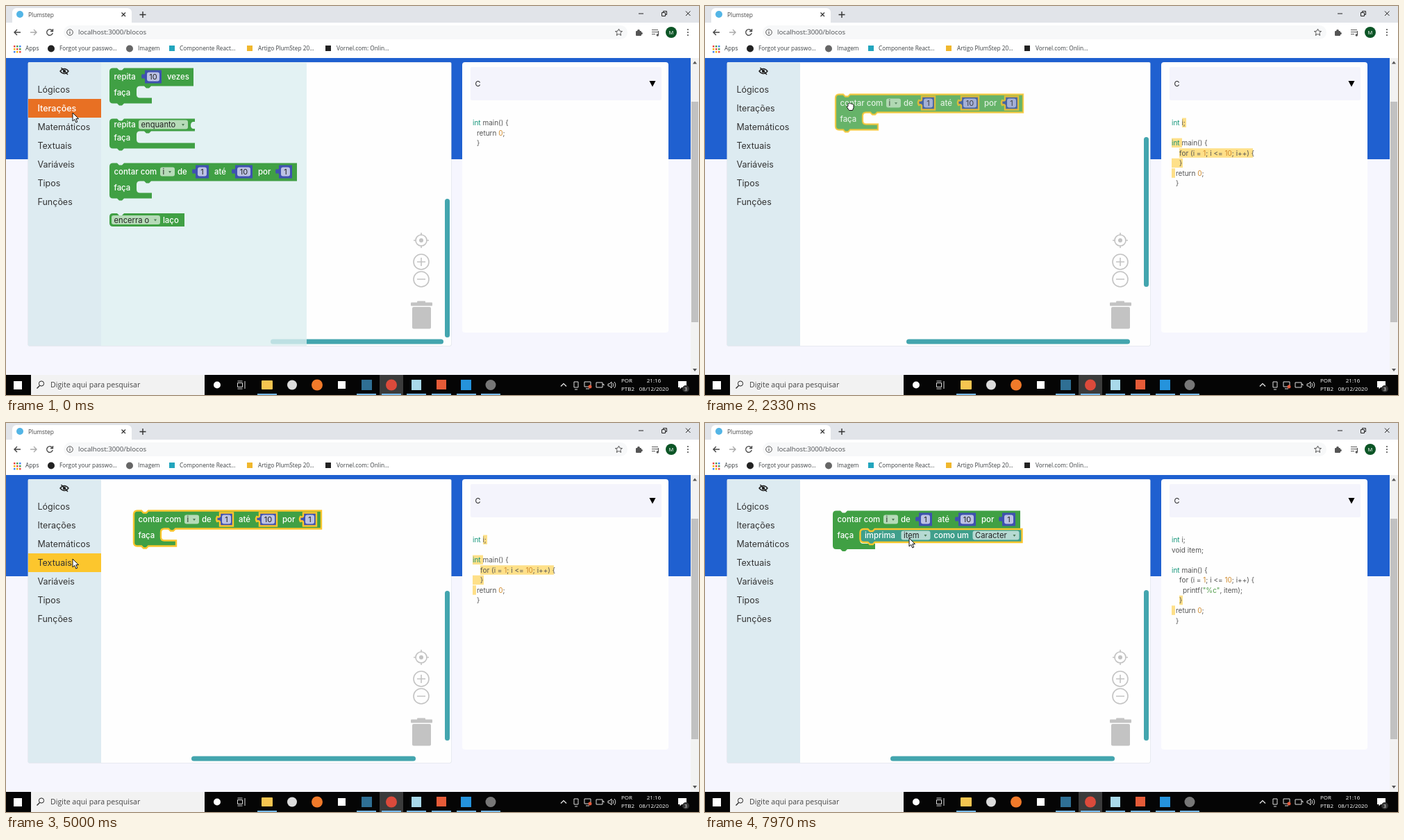
An HTML page with a canvas that plays this animation: 998 px wide and 561 px high, repeating every 8000 ms.

```html
<!DOCTYPE html>
<html lang="pt-BR">
<head>
<meta charset="utf-8">
<title>Plumstep</title>
<style>
  html, body { margin: 0; width: 100%; height: 100%; overflow: hidden; background: #fff; }
  canvas { display: block; width: 998px; height: 561px; }
</style>
</head>
<body>
<canvas id="stage"></canvas>
<script>
const LOOP = 8000, W = 998, H = 561;
const PICK_LOOP = 1640, DROP_LOOP = 2600, OPEN_TEXT = 5200, PICK_PRINT = 6700, DROP_PRINT = 7400;
const UI = '"Open Sans", sans-serif', APP = 'Inter, sans-serif';
const GREEN = '#40a044', TEAL = '#3f9f8b', BLUE = '#3f51b0', YELLOW = '#fcc62d';
const canvas = document.getElementById('stage');
const dpr = window.devicePixelRatio || 1;
canvas.width = W * dpr;
canvas.height = H * dpr;
const c = canvas.getContext('2d');

// ---- drawing helpers ----
function rect(x, y, w, h, color, r = 0) {
  c.fillStyle = color;
  c.beginPath();
  c.roundRect(x, y, w, h, r);
  c.fill();
}
function disc(x, y, r, color) {
  c.fillStyle = color;
  c.beginPath();
  c.arc(x, y, r, 0, 7);
  c.fill();
}
function ring(x, y, r, color, width = 1) {
  c.strokeStyle = color;
  c.lineWidth = width;
  c.beginPath();
  c.arc(x, y, r, 0, 7);
  c.stroke();
}
function path(d, color, width = 1.2, fill) {
  const p = new Path2D(d);
  if (fill) { c.fillStyle = fill; c.fill(p); }
  if (color) { c.strokeStyle = color; c.lineWidth = width; c.stroke(p); }
}
function text(s, x, y, size, color, font = UI, weight = 400, align = 'left') {
  c.font = `${weight} ${size}px ${font}`;
  c.fillStyle = color;
  c.textAlign = align;
  c.fillText(s, x, y + size * 0.36);
}
function at(x, y, draw) {
  c.save();
  c.translate(x, y);
  draw();
  c.restore();
}

// ---- browser and desktop ----
function drawBrowser() {
  rect(0, 0, W, 24, '#e1e4e9');
  rect(9, 3, 172, 22, '#fff', [6, 6, 0, 0]);
  rect(0, 24, W, 51, '#fff');
  disc(20, 12, 5, '#53b5e6');
  text('Plumstep', 32, 12.5, 8.4, '#444');
  path('M166.500 9.500l5.500 5.500m0-5.500l-5.500 5.500', '#333');
  path('M192.500 12.500h9m-4.500-4.500v9', '#333', 1.4);
  path('M911 11h7M979 7.500l6.500 6.500m0-6.500l-6.500 6.500M944.500 9.500h5v5h-5zM946.500 9.500v-2h5v5h-2', '#222', 1);
  path('M21 38H12m4-4l-4 4 4 4', '#444', 1.4);
  path('M35 38h9m-4-4l4 4-4 4', '#aaa', 1.4);
  path('M66.500 35.500a4.300 4.300 0 1 0 .7 3.500M67.500 33v3.500h-3.500', '#444', 1.3);
  rect(83, 28, 812, 20, '#f7f8f9', 10);
  ring(92, 38, 4.3, '#555');
  path('M92 37.300v3M92 35.300v1', '#555');
  text('localhost:3000/blocos', 104, 38, 9.7, '#4a4d50');
  path('M882.500 33l1.500 3.200 3.500.3-2.700 2.300.9 3.600-3.200-1.900-3.200 1.900.9-3.600-2.700-2.300 3.500-.3z', '#555', 1);
  rect(907, 36, 8, 7, '#555', 1);
  disc(911, 35.500, 1.8, '#555');
  disc(915, 39.500, 1.8, '#555');
  path('M930 34.500h9m-9 3h9m-9 3h5M939.500 36v6', '#555');
  disc(938.300, 42, 1.7, '#555');
  disc(958, 38, 8, '#0c5526');
  text('M', 958, 38, 7.5, '#fff', UI, 400, 'center');
  for (const y of [34, 38, 42]) disc(982, y, 1.1, '#555');

  const appColors = ['#e44', '#4a9e52', '#4285f4', '#f4b400'];
  for (let i = 0; i < 9; i++) rect(11 + i % 3 * 4, 57 + (i / 3 | 0) * 4, 2.5, 2.5, appColors[i % 4]);
  disc(65, 61.500, 5, '#222');
  disc(178, 61.500, 5, '#666');
  rect(235, 57, 8, 8, '#22a5bd');
  rect(347, 57, 8, 8, '#f0b72d');
  rect(460, 57, 8, 8, '#222');
  const marks = [['Apps', 28], ['Forgot your passwo...', 77], ['Imagem', 190], ['Componente React...', 250],
    ['Artigo PlumStep 20...', 363], ['Vornel.com: Onlin...', 476]];
  for (const [s, x] of marks) text(s, x, 61.500, 8.3, '#3c4043');
}

function drawTaskbar() {
  rect(0, 532, W, 29, '#050505');
  rect(11, 541, 12, 12, '#fff');
  rect(36, 532, 250, 29, '#f2f2f2');
  ring(51, 544.500, 3.6, '#222');
  path('M48.500 547.500l-4 4', '#222', 1.3);
  text('Digite aqui para pesquisar', 64, 546.500, 10.6, '#444');
  disc(304, 546.500, 5, '#fff');
  path('M333.500 543.500h7v6h-7zM333.500 541h7M333.500 552h7M344 541v11', '#ddd', 1);
  rect(538, 532, 34, 29, '#3b3b3b');
  rect(368, 540, 16, 13, '#f6c550', 1);
  disc(412, 546.500, 7, '#ddd');
  disc(448, 546.500, 8, '#f17a2a');
  rect(478, 541, 11, 11, '#fff');
  rect(512, 539, 15, 15, '#2f6f94');
  disc(555, 546.500, 8, '#dc4a3b');
  rect(584, 539, 14, 15, '#a9d9ea');
  rect(620, 539, 14, 14, '#e65b38');
  rect(655, 539, 15, 15, '#2593dc');
  disc(698, 546.500, 7.5, '#777');
  for (const x of [362, 505, 541, 577, 613, 649, 684]) rect(x, 559, 28, 2, '#76b9ed');
  path('M799 548.500l4-4 4 4', '#eee');
  path('M818 542h6v8h-6zM819 553h4M833 542h9v7h-9zM835 552h5M850 543h9v7h-9zM859 545.500h2v2', '#ddd', 1);
  disc(841, 549, 2.5, '#e25a3c');
  path('M867 545h2l3-3v9l-3-3h-2zM874 544q2 2.500 0 5M876 542q3.500 4.500 0 9', '#ddd', 1);
  text('POR', 886, 540, 8, '#fff');
  text('PTB2', 886, 552.500, 8, '#fff');
  text('21:16', 933, 540, 8, '#fff', UI, 400, 'center');
  text('08/12/2020', 933, 552.500, 8, '#fff', UI, 400, 'center');
  path('M968 541h12v9h-7l-2.500 2.500v-2.500h-2.500z', null, 0, '#fff');
  disc(979, 552, 5, '#333');
  text('3', 979, 552, 7, '#fff', UI, 400, 'center');
}

// ---- page ----
function drawPage() {
  rect(0, 75, 986, 457, '#f6f6fe');
  rect(0, 75, 986, 146, '#1f60d0');
  rect(986, 75, 12, 457, '#f2f2f2');
  rect(987, 138, 10, 318, '#c1c1c1');
  path('M989 83.500l3-4 3 4z', null, 0, '#555');
  path('M989 523l3 4 3-4z', null, 0, '#555');
  rect(31.500, 81, 610, 409.500, '#d9dde4', 2);
  rect(32, 81.500, 609, 408.500, '#fefefe', 2);
  rect(657, 81, 297, 390, '#fefefe', 4);
  rect(669, 88, 275, 48, '#f4f4fc', 2);
  text('C', 675.500, 112, 11, '#222', APP);
  path('M926.500 108h9l-4.500 8.500z', null, 0, '#000');
}

function drawControls() {
  const gray = '#c3c3c3';
  ring(598, 338, 8, gray, 1.6);
  disc(598, 338, 3, gray);
  path('M598 327v4M598 345v4M587 338h4M605 338h4', gray, 1.6);
  ring(598, 369, 11, gray, 1.6);
  ring(598, 394, 11, gray, 1.6);
  path('M592 369h12M598 363v12M592 394h12', gray, 1.6);
  rect(583, 427.500, 31, 5, gray, 1);
  rect(592, 425.500, 12, 3, gray, 1);
  rect(585, 434, 27, 31.500, gray, 2);
}

function drawScrollbars(t) {
  const [top, bottom, left, right] =
    t < PICK_LOOP ? [278, 478, 381, 630] :
    t < DROP_LOOP ? [189, 405, 290, 612] :
    t < PICK_PRINT ? [242, 458, 267, 590] :
    t < DROP_PRINT ? [240, 458, 283, 592] : [241, 458, 267, 590];
  rect(632, top, 7, bottom - top, '#43a5ae', 3.5);
  rect(left, 480.500, right - left, 7, '#43a5ae', 3.5);
}

function drawSidebar(selected, pointer) {
  rect(32, 81.500, 105, 408.500, '#ddebf1');
  path('M78 94q6-7 12 0q-6 7-12 0zM79.500 89l9.500 10', '#222', 1.4);
  disc(84, 94, 2.2, '#222');
  ['Lógicos', 'Iterações', 'Matemáticos', 'Textuais', 'Variáveis', 'Tipos', 'Funções'].forEach((name, i) => {
    const top = 107 + 27 * i, active = i === selected;
    const hover = pointer.x > 32 && pointer.x < 137 && pointer.y >= top && pointer.y < top + 27;
    if (active || hover) rect(32, top, 105, 27, active ? '#e87023' : YELLOW);
    text(name, 45.500, top + 13.500, 12.5, active ? '#fff' : '#333', APP, active ? 500 : 400);
  });
}

// ---- code panel ----
const KEYWORD = '#149579', NUMBER = '#d08a2c', STRING = '#4c9a45', PLAIN = '#555';
const INT_I = [672, 'int', KEYWORD, ' i;', PLAIN];
const MAIN = [672, 'int', KEYWORD, ' main() {', PLAIN];
const FOR = [683, 'for (i = ', PLAIN, '1', NUMBER, '; i <= ', PLAIN, '10', NUMBER, '; i++) {', PLAIN];
const RETURN = [678, 'return ', PLAIN, '0', NUMBER, ';', PLAIN];
const INNER_END = [683, '}', PLAIN], END = [678, '}', PLAIN];
const VOID = [672, 'void item;', PLAIN];
const PRINTF = [688, 'printf(', PLAIN, '"%c"', STRING, ', item);', PLAIN];
const listings = [
  { lines: [MAIN, RETURN, END], marks: [] },
  { lines: [INT_I, [0], MAIN, FOR, INNER_END, RETURN, END],
    marks: [[0, 687, 6], [2, 672, 15], [3, 683, 106], [4, 672, 16], [5, 672, 5]] },
  { lines: [INT_I, VOID, [0], MAIN, FOR, PRINTF, INNER_END, RETURN, END],
    marks: [[6, 683, 5], [7, 672, 5]] }
];
function drawCode({ lines, marks }) {
  const lineY = i => 168.500 + 14.55 * i;
  for (const [i, x, w] of marks) rect(x, lineY(i) - 7, w, 13.500, '#fee089');
  lines.forEach(([x, ...parts], i) => {
    for (let k = 0; k < parts.length; k += 2) {
      text(parts[k], x, lineY(i), 10, parts[k + 1], APP);
      x += c.measureText(parts[k]).width;
    }
  });
}

// ---- blocks, drawn around their own top left corner ----
function shape(d, color, selected) {
  path(d, selected ? YELLOW : null, 2.4, color);
}
const NOTCH = 'l3 3h4l3-3', TAB = 'l-3 3h-4l-3-3';
function stackShape(w, h, color, selected, { mouth = 0, foot = 0, next = true } = {}) {
  let d = `M0 5Q0 0 5 0H11${NOTCH}H${w}V${h}`;
  let bottom = h;
  if (mouth) {
    bottom = h + mouth + 8;
    d += `H60${TAB}H44Q39 ${h} 39 ${h + 5}V${h + mouth - 5}Q39 ${h + mouth} 44 ${h + mouth}H${foot}V${bottom}`;
  }
  d += `H21${next ? TAB : ''}H5Q0 ${bottom} 0 ${bottom - 5}Z`;
  shape(d, color, selected);
}
function valueShape(w, h, color, selected) {
  shape(`M0 0H${w}V${h}H0V13Q-1 11-4 12.500Q-6 9-4 5.500Q-1 7 0 5Z`, color, selected);
}
const label = (s, x, y) => text(s, x, y, 11.4, '#fff', APP, 500);
function dropdown(s, x, y, w) {
  rect(x, y - 6.500, w, 13, 'rgba(255,255,255,.62)', 3);
  text(s, x + 3.500, y, 11.2, '#222', APP);
  path(`M${x + w - 9} ${y - 1}h4l-2 3z`, null, 0, '#4c7a55');
}
function number(s, x, y, w, selected) {
  at(x, y - 9.500, () => {
    valueShape(w, 19, BLUE, selected);
    rect(3, 3, w - 6, 13, '#bcc2e4', 3);
    text(s, w / 2, 9.500, 11, '#222', APP, 400, 'center');
  });
}

function repeatBlock() {
  stackShape(121, 26, GREEN, false, { mouth: 17, foot: 61 });
  label('repita', 6.500, 12.500);
  number('10', 51, 12.500, 24);
  label('vezes', 83, 12.500);
  label('faça', 6.500, 35);
}
function whileBlock() {
  stackShape(123, 18, GREEN, false, { mouth: 17, foot: 123 });
  path('M124 4.500h-4q-3 1-3 5t3 5h4z', null, 0, '#e3f2f2');
  label('repita', 6.500, 8.500);
  dropdown('enquanto', 42, 8.500, 71);
  label('faça', 6.500, 27);
}
function countBlock(selected, mouth = 17) {
  stackShape(270, 26, GREEN, selected, { mouth, foot: 61 });
  label('contar com', 6.500, 12.500);
  dropdown('i', 73, 12.500, 21);
  label('de', 98, 12.500);
  number('1', 124, 12.500, 19, selected);
  label('até', 151, 12.500);
  number('10', 181, 12.500, 25, selected);
  label('por', 214, 12.500);
  number('1', 244, 12.500, 19, selected);
  label('faça', 6.500, 35);
}
function breakBlock() {
  stackShape(108, 19, GREEN, false, { next: false });
  dropdown('encerra o', 3, 9.500, 70);
  label('laço', 77, 9.500);
}
function quoteBlock() {
  valueShape(49, 18, TEAL);
  text('“', 6, 11, 18, '#fff', APP, 700);
  rect(19, 3, 10, 12, '#a8d2c6', 3);
  text('”', 33, 11, 18, '#fff', APP, 700);
}
function printTextBlock() {
  stackShape(70, 19, TEAL);
  label('imprima', 6.500, 9);
  rect(56, 3, 10, 12, '#a8d2c6', 3);
}
function printBlock(selected) {
  stackShape(233, 19, TEAL, selected);
  label('imprima', 6.500, 9);
  dropdown('item', 59, 9, 42);
  label('como um', 106, 9);
  dropdown('Caracter', 162, 9, 67);
}
function readBlock() {
  stackShape(206, 19, TEAL);
  label('leia', 6.500, 9);
  dropdown('item', 32, 9, 42);
  label('como um', 79, 9);
  dropdown('Caracter', 135, 9, 67);
}
function drawFlyout(right, items) {
  rect(137, 81.500, right - 137, 408.500, 'rgba(221,239,240,.8)');
  for (const [y, draw] of items) at(149, y, draw);
}

// ---- pointer ----
const pointerKeys = [
  [0, 96, 154], [350, 96, 155], [1150, 169, 240], [1600, 170, 244], [PICK_LOOP, 170, 244],
  [2250, 210, 145], [2500, 206, 145], [DROP_LOOP, 205, 144], [2750, 203, 145], [3250, 112, 172], [3850, 104, 197],
  [4400, 104, 197], [5000, 96, 196], [5950, 96, 196], [6450, 175, 181], [PICK_PRINT + 30, 175, 182],
  [7250, 248, 171], [DROP_PRINT, 249, 170], [7500, 251, 170], [7850, 294, 166], [LOOP, 294, 166]
];
function pointerAt(t) {
  const i = pointerKeys.findIndex(k => k[0] > t);
  const [t0, x0, y0] = pointerKeys[i - 1], [t1, x1, y1] = pointerKeys[i];
  const u = (t - t0) / (t1 - t0), e = u * u * (3 - 2 * u);
  return { x: x0 + (x1 - x0) * e, y: y0 + (y1 - y0) * e };
}
function drawPointer({ x, y }, hand) {
  at(x, y, () => hand
    ? path('M-3-4q1.500-2 2.500 0q1-1.500 2.200.2q1.500-1 2 .8q1.300-.3 1.300 1.500v3l-1.500 4h-5l-3-4.500q-.3-2 1.500-1.500z', '#111', 1, '#fff')
    : path('M0 0v12l2.800-2.600 2 4.600 2-.9-2-4.500h3.700z', '#111', 1, '#fff'));
}

// ---- scene ----
function render(t) {
  c.setTransform(dpr, 0, 0, dpr, 0, 0);
  const pointer = pointerAt(t);
  const loopDragging = t >= PICK_LOOP && t < DROP_LOOP;
  const printDragging = t >= PICK_PRINT && t < DROP_PRINT;
  const textOpen = t >= OPEN_TEXT && t < PICK_PRINT;
  drawBrowser();
  drawPage();
  drawCode(listings[t < PICK_LOOP ? 0 : t < DROP_PRINT ? 1 : 2]);
  drawControls();
  drawScrollbars(t);

  if (t >= PICK_LOOP) {
    c.globalAlpha = loopDragging ? 0.8 : 1;
    const x = loopDragging ? pointer.x - 21 : 184, y = loopDragging ? pointer.y - 17.500 : 126.500;
    at(x, y, () => countBlock(t < 6500, t < DROP_PRINT ? 17 : 21.500));
    c.globalAlpha = 1;
  }
  if (t < PICK_LOOP) {
    drawFlyout(433, [[89.500, repeatBlock], [162.500, whileBlock],
      [226.500, () => countBlock(t >= 1450)], [299, breakBlock]]);
  }
  if (textOpen) {
    drawFlyout(394.500, [[89, quoteBlock], [125, printTextBlock],
      [165, () => printBlock(t >= 6500)], [204.500, readBlock]]);
  }
  if (printDragging) {
    c.globalAlpha = 0.8;
    at(pointer.x - 26, pointer.y - 17, () => printBlock(true));
    c.globalAlpha = 1;
  } else if (t >= DROP_PRINT) {
    at(223.500, 153, () => printBlock(true));
  }
  drawSidebar(t < PICK_LOOP ? 1 : textOpen ? 3 : -1, pointer);
  drawTaskbar();
  drawPointer(pointer, (t > 1050 && t < 2700) || (t > 6300 && t < 7450));
}

const start = performance.now();
function tick() {
  render((performance.now() - start) % LOOP);
  requestAnimationFrame(tick);
}
tick();
</script>
</body>
</html>
```
